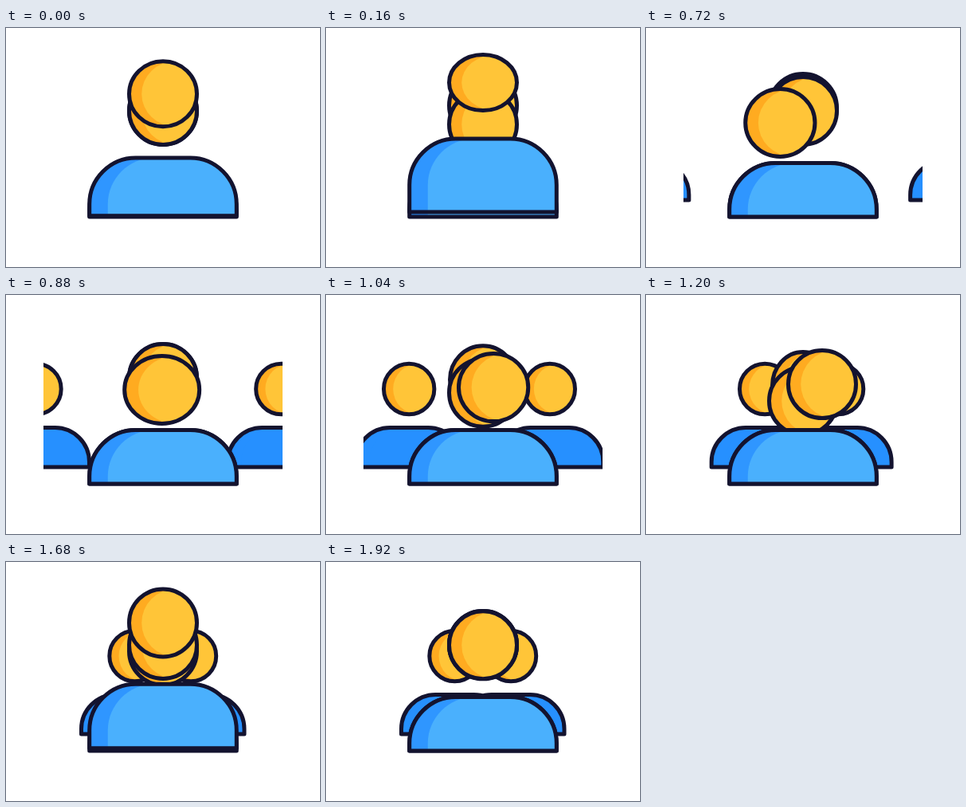
Animation of 394 by 300 pixels, one loop 1960 ms. Source, as an HTML page with a canvas:

```html
<!DOCTYPE html>
<html lang="en">
<head>
<meta charset="utf-8">
<title>Team</title>
<style>
  html, body { margin: 0; width: 100%; height: 100%; overflow: hidden; background: #fff; }
  canvas { display: block; width: 394px; height: 300px; }
</style>
</head>
<body>
<canvas id="stage"></canvas>
<script>
const W = 394, H = 300, LOOP = 1960, STEP = 40;
const INK = '#13132f';
const SKIN = '#ffc538', SKIN_SHADE = '#ffab20';
const SHIRT = '#4ab0fd', SHIRT_SHADE = '#2f96ff', SIDE_SHIRT = '#2690ff';
const MID = 197, HEAD_Y = 104, HEAD_R = 42.5, SHIRT_TOP = 169.5, FLOOR = 237;

const canvas = document.getElementById('stage');
const ratio = window.devicePixelRatio || 1;
canvas.width = W * ratio;
canvas.height = H * ratio;
const ctx = canvas.getContext('2d');
ctx.scale(ratio, ratio);

const progress = (t, from, to) => Math.min(1, Math.max(0, (t - from) / (to - from)));
// 0 to 1 and back to 0: an arc starts abruptly, a pulse starts softly.
const arc = (t, from, to) => Math.sin(Math.PI * progress(t, from, to));
const pulse = (t, from, to) => arc(t, from, to) ** 2;
// Slow start, long settling.
const settle = u => 1 - (1 - u ** 2.5) ** 5.5;

// Fills a shape, lays its lighter copy over it shifted right, then outlines it.
function shaded(shape, shift, shade, light) {
  ctx.fillStyle = shade;
  ctx.fill(shape);
  ctx.save();
  ctx.clip(shape);
  ctx.translate(shift, 0);
  ctx.fillStyle = light;
  ctx.fill(shape);
  ctx.restore();
  ctx.stroke(shape);
}

function head(x, y, rx, ry = rx) {
  const shape = new Path2D();
  shape.ellipse(x, y, rx, ry, 0, 0, Math.PI * 2);
  shaded(shape, rx * 0.37, SKIN_SHADE, SKIN);
}

function torso(x, half, top, bottom, round, shade, light) {
  const l = x - half, r = x + half, k = round * 0.45;
  const shape = new Path2D();
  shape.moveTo(l, bottom);
  shape.lineTo(l, top + round);
  shape.bezierCurveTo(l, top + k, l + k, top, l + round, top);
  shape.lineTo(r - round, top);
  shape.bezierCurveTo(r - k, top, r, top + k, r, top + round);
  shape.lineTo(r, bottom);
  shape.closePath();
  shaded(shape, half * 0.25, shade, light);
}

// Slides in from beyond the clipped edge; distance is negative on the left.
function sidePerson(t, side, start, distance) {
  const shift = distance * (1 - settle(progress(t, start, start + 960)));
  torso(MID + side + shift, 67, 166.5, 216, 43, SIDE_SHIRT, SIDE_SHIRT);
  head(MID + side + shift, 118, 31.7);
}

function backHead(t) {
  const y = HEAD_Y - 21 * pulse(t, 0, 840) + 17 * pulse(t, 920, 1920);
  head(MID, y, HEAD_R - 4 * pulse(t, 960, 1440), HEAD_R);
}

function bouncingHead(t) {
  head(MID, HEAD_Y + 26.5 * arc(t, 0, 720) + 29.7 * arc(t, 880, 1620), HEAD_R);
}

// Hops, swings left, then right, and hops again.
function swingingHead(t) {
  const left = 45 * pulse(t, 240, 920), right = 24 * pulse(t, 860, 1540);
  const hop = 50.5 * pulse(t, -275, 580) + 44 * pulse(t, 1140, 2110);
  const rx = HEAD_R + 4.5 * pulse(t, 640, 1120) - 2 * pulse(t, 300, 660);
  const ry = HEAD_R - 7.5 * pulse(t, -60, 360) + 1.5 * pulse(t, 1300, 1660);
  head(MID - left + right, 119 - hop - 0.22 * right, rx, ry);
}

function mainTorso(rise) {
  torso(MID, 92.3, SHIRT_TOP - rise, FLOOR - rise * 0.2, 58, SHIRT_SHADE, SHIRT);
}

function draw(t) {
  ctx.fillStyle = '#fff';
  ctx.fillRect(0, 0, W, H);
  ctx.save();
  ctx.beginPath();
  ctx.rect(47, 0, 300, H);
  ctx.clip();
  ctx.strokeStyle = INK;
  ctx.lineWidth = 5;
  ctx.lineJoin = 'round';

  sidePerson(t, -35.5, 540, -190);
  sidePerson(t, 35, 520, 186);
  backHead(t);
  bouncingHead(t);
  swingingHead(t);
  mainTorso(0);
  mainTorso(30.5 * pulse(t, -70, 390) + 19 * pulse(t, 1380, 1860));
  ctx.restore();
}

const start = performance.now();
function tick() {
  const t = (performance.now() - start) % LOOP;
  draw(Math.floor(t / STEP) * STEP);
  requestAnimationFrame(tick);
}
tick();
</script>
</body>
</html>
```
